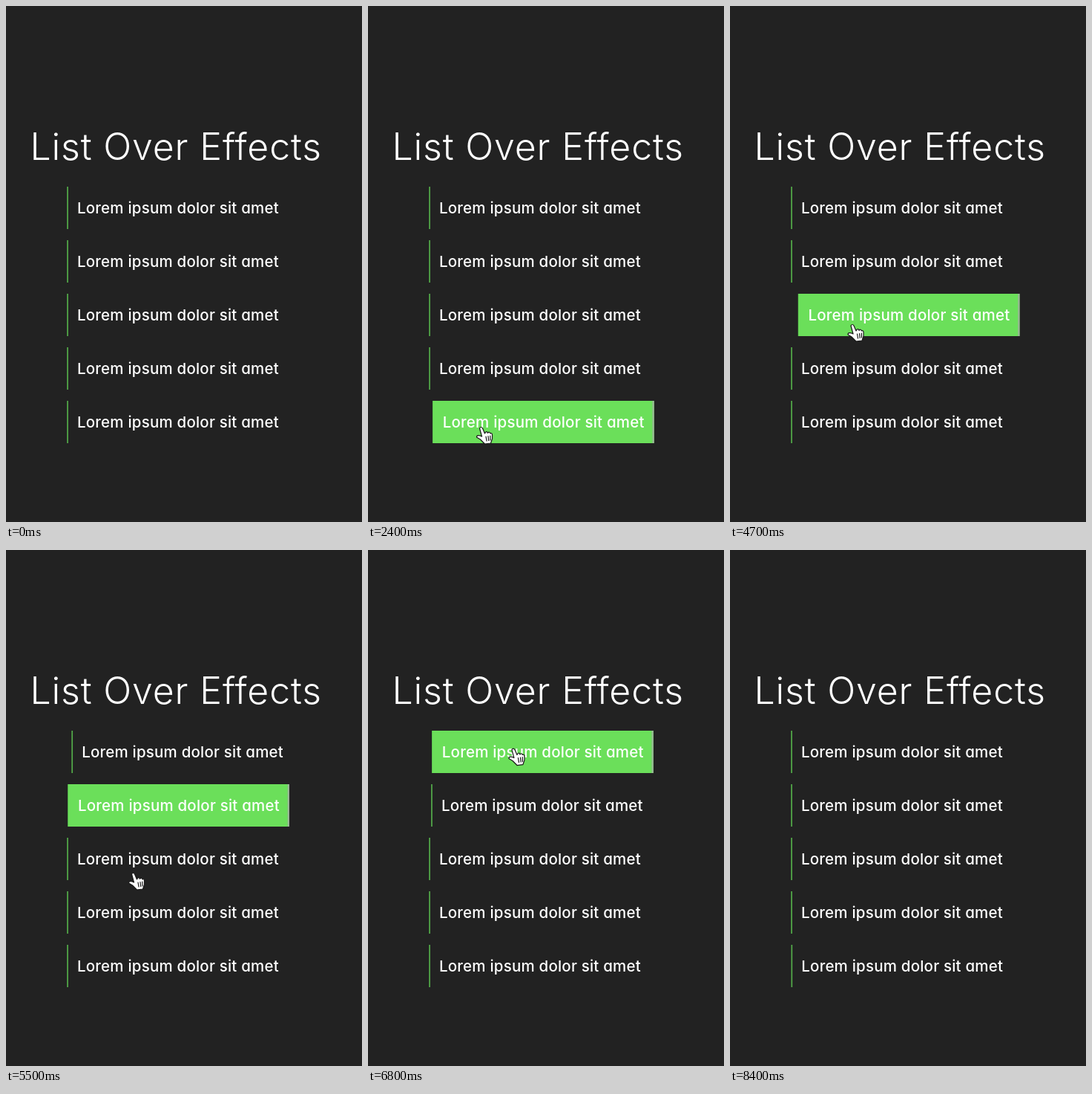
Recreate the animation shown at these times as an HTML page. Size 480 px wide and 694 px high, loop 8.5 s.

```html
<!DOCTYPE html>
<html lang="en">
<head>
<meta charset="utf-8">
<title>List Over Effects</title>
<style>
  html, body { margin: 0; width: 100%; height: 100%; overflow: hidden; background: #222; }
  svg { display: block; width: 100%; height: 100%; }
  text {
    font-family: Inter, Lato, sans-serif;
    font-feature-settings: "cv11";
    font-optical-sizing: none;
    fill: #fff;
  }
  .title { font-size: 50px; font-weight: 350; letter-spacing: .85px; }
  .label { font-size: 20.5px; font-weight: 450; letter-spacing: .2px; }
</style>
</head>
<body>
<svg viewBox="0 0 480 694">
  <rect width="480" height="694" fill="#222"/>
  <text class="title" x="32.4" y="207">List Over Effects</text>
  <g id="list"></g>
  <g id="cursor">
    <path id="arrow" d="M0 0V20L4.5 16 8 24 11.5 22.5 8.3 15H14.5Z"
      fill="#222" stroke="#fff" stroke-width="1.5" stroke-linejoin="round"/>
    <g id="hand" stroke="#181818" stroke-width="1.2" stroke-linejoin="round" stroke-linecap="round">
      <path fill="#fff" d="M-1 1C0-1 2-1 3 1L6 8C7 5 9.5 5 10 7.5 11 5.5 13 6 13.5 8 15 7 16 8 16 10V15L14 21 6 22 0 16-5 13C-5 10-2 10 2 12Z"/>
      <path fill="none" d="M7.5 12l1 6M10.5 11.5l.7 6M13.3 11l.2 6"/>
    </g>
  </g>
</svg>
<script>
const LOOP = 8500, STEP = 100;
const ROWS = 5, TOP = 243, PITCH = 72, HEIGHT = 57;
const SLIDE = 9.5, SLIDE_MS = 300, LAG = 70, SAMPLE = 10;
const $ = id => document.getElementById(id);

// Pointer stops: time, x, y; it eases from one to the next
const stops = [
  [300, 270, 720], [1300, 180, 620], [1900, 180, 620], [2400, 151.5, 567],
  [3150, 155, 506], [4700, 164, 429], [5300, 178, 285], [5700, 163, 585],
  [6150, 174, 376], [6900, 196, 262], [7550, 200, 290], [7700, 203, 389],
  [8350, 214, 720]
];

const rows = Array.from({ length: ROWS }, (_, i) => {
  const y = TOP + PITCH * i;
  $("list").insertAdjacentHTML("beforeend", `<g>
    <rect x="82.2" y="${y}" width="1.7" height="${HEIGHT}" fill="#54ac4a"/>
    <g>
      <rect x="82.7" y="${y}" width="298.3" height="${HEIGHT}" fill="#6bdf5a"/>
      <rect x="378.7" y="${y}" width="2.3" height="${HEIGHT}" fill="#98b795"/>
    </g>
    <text class="label" x="96" y="${y + 35.5}">Lorem ipsum dolor sit amet</text>
  </g>`);
  const group = $("list").lastElementChild;
  return { group, fill: group.children[1] };
});

const ease = u => u * u * (3 - 2 * u);
const show = (el, on) => el.setAttribute("visibility", on ? "visible" : "hidden");

function pointerAt(t) {
  const next = stops.findIndex(stop => stop[0] > t);
  if (next < 1) return stops.at(next).slice(1);
  const [t0, x0, y0] = stops[next - 1], [t1, x1, y1] = stops[next];
  const u = ease((t - t0) / (t1 - t0));
  return [x0 + (x1 - x0) * u, y0 + (y1 - y0) * u];
}

// Row under the pointer, which the page notices a little late; -1 for none
function rowAt(t) {
  const y = pointerAt(t - LAG)[1] - TOP;
  const row = Math.floor(y / PITCH);
  return row >= 0 && row < ROWS && y - row * PITCH < HEIGHT ? row : -1;
}

// A row slides by the share of recent time it was hovered
function slides(t) {
  const shares = Array(ROWS).fill(0);
  for (let ago = 0; ago < SLIDE_MS; ago += SAMPLE) {
    const row = rowAt(t - ago);
    if (row >= 0) shares[row] += SAMPLE / SLIDE_MS;
  }
  return shares.map(share => SLIDE * ease(share));
}

function draw(t) {
  const hovered = rowAt(t), shift = slides(t);
  rows.forEach(({ group, fill }, i) => {
    group.setAttribute("transform", `translate(${shift[i]} 0)`);
    show(fill, i === hovered);
  });
  $("cursor").setAttribute("transform", `translate(${pointerAt(t)})`);
  show($("arrow"), hovered < 0);
  show($("hand"), hovered >= 0);
}

const begin = performance.now();
function tick() {
  const t = (performance.now() - begin) % LOOP;
  draw(Math.floor(t / STEP) * STEP);
  requestAnimationFrame(tick);
}
tick();
</script>
</body>
</html>
```
